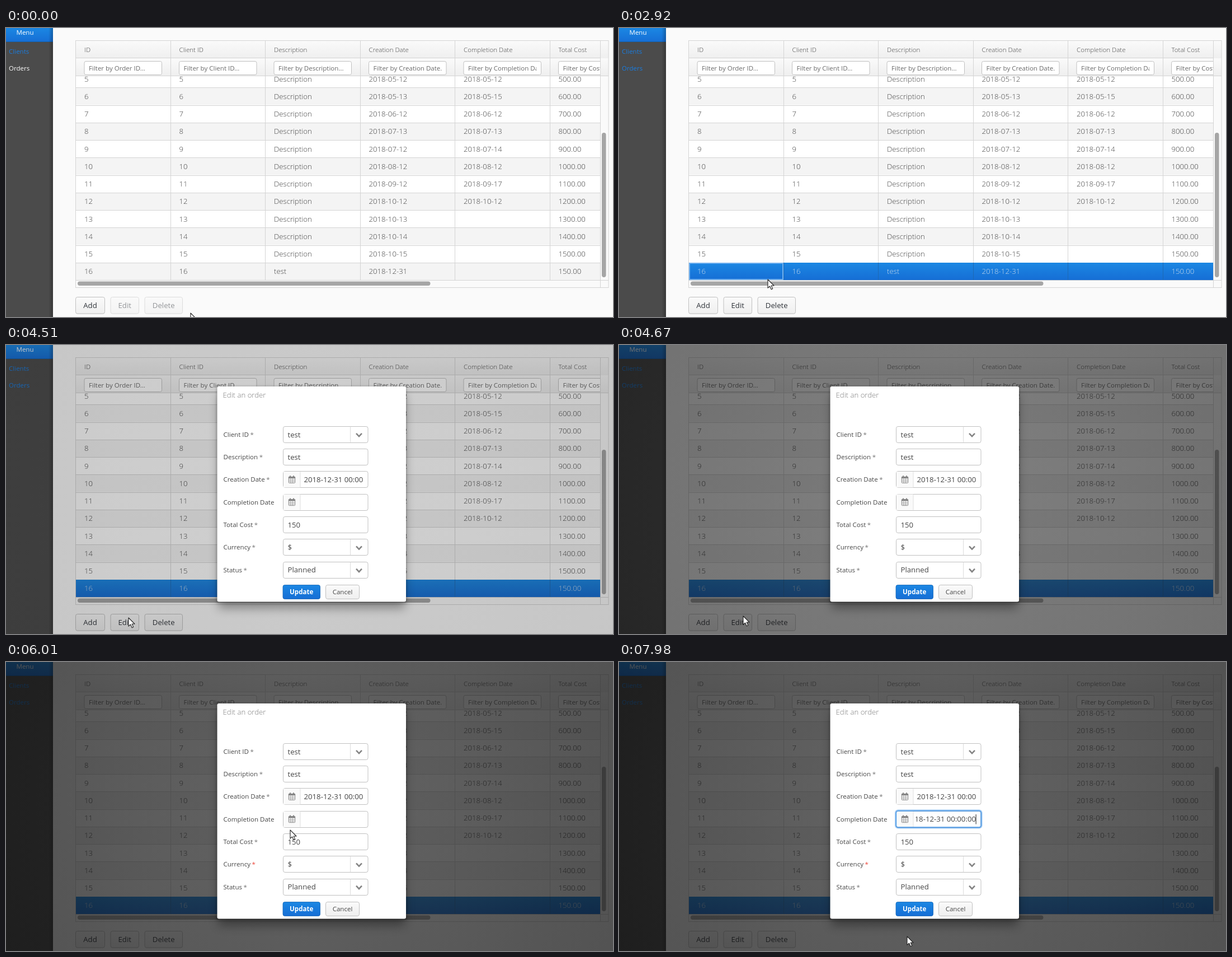
Recreate the animation shown at these times as an HTML page. Size 1085x516 px, loop 8 s.

```html
<!DOCTYPE html>
<html lang="en">
<head>
<meta charset="utf-8">
<title>Orders</title>
<style>
  html, body { margin: 0; width: 100%; height: 100%; overflow: hidden; background: #fafafa; }
  svg { display: block; width: 1085px; height: 516px; }
  text { font-family: "Open Sans", "Noto Sans", sans-serif; font-size: 13.2px; fill: #464646; white-space: pre; }
  .light { font-weight: 300; }
  .small { font-size: 11.55px; }
  .mid { text-anchor: middle; }
  .on text { fill: #c8dbed; }
</style>
</head>
<body>
<svg id="stage" viewBox="0 0 1085 516"></svg>
<script>
const LOOP = 8000;
const LINE = '#d4d4d4', EDGE = '#c0c0c0', BLUE = '#197de1';
const COL = 169.5, ROW = 31.25;

// ---- drawing helpers ----
const rect = (x, y, w, h, fill, more = '') =>
  `<rect x="${x}" y="${y}" width="${w}" height="${h}" fill="${fill}" ${more}/>`;
const text = (x, y, s, cls = '', more = '') =>
  `<text x="${x}" y="${y}" class="${cls}" ${more}>${s}</text>`;
const path = (d, more) => `<path d="${d}" fill="none" ${more}/>`;
const group = (id, body, more = '') => `<g id="${id}" ${more}>${body}</g>`;
const clip = (id, x, y, w, h) => `<clipPath id="${id}">${rect(x, y, w, h, '#000')}</clipPath>`;
const stroke = (c, w = 1) => `stroke="${c}" stroke-width="${w}"`;
const colX = i => 124.5 + COL * i;

const defs = `<defs>
  <linearGradient id="face" x2="0" y2="1"><stop stop-color="#fafafa"/><stop offset="1" stop-color="#efefef"/></linearGradient>
  <linearGradient id="blue" x2="0" y2="1"><stop stop-color="#1b87e3"/><stop offset="1" stop-color="#166ed5"/></linearGradient>
  <linearGradient id="edge"><stop stop-color="#000" stop-opacity="0"/><stop offset="1" stop-color="#000" stop-opacity=".25"/></linearGradient>
  <radialGradient id="dim" gradientUnits="userSpaceOnUse" cx="542" cy="258" r="600"><stop stop-color="#222"/><stop offset="1" stop-color="#0b0b0b"/></radialGradient>
  <filter id="soft" x="-30%" y="-30%" width="160%" height="160%"><feGaussianBlur stdDeviation="9"/></filter>
  <filter id="near" x="-10%" y="-10%" width="120%" height="120%"><feGaussianBlur stdDeviation="2"/></filter>
  ${clip('body', 125, 85, 937, 365)}${clip('head', 125, 23, 937, 63)}
  ${clip('date', 527, 220, 111.8, 80)}${clip('done', 530.5, 266, 108.5, 30)}
</defs>`;

function sidebar() {
  return rect(0, 0, 84, 516, '#4b4b4b') + rect(0, 0, 84, 25, 'url(#blue)') +
    rect(0, 24, 84, 1, '#1362b1') + rect(76, 0, 8, 516, 'url(#edge)') +
    text(34, 12.2, 'Menu', 'small mid', 'style="fill:#fff"') +
    text(5, 46, 'Clients', 'small', `style="fill:${BLUE}"`) +
    text(5, 76.2, 'Orders', 'small', 'id="orders"');
}

// ---- order table ----
const dates = {
  5: ['05-12', '05-12'], 6: ['05-13', '05-15'], 7: ['06-12', '06-12'], 8: ['07-13', '07-13'],
  9: ['07-12', '07-14'], 10: ['08-12', '08-12'], 11: ['09-12', '09-17'], 12: ['10-12', '10-12'],
  13: ['10-13'], 14: ['10-14'], 15: ['10-15'], 16: ['12-31']
};
const heads = ['ID', 'Client ID', 'Description', 'Creation Date', 'Completion Date', 'Total Cost'];
const hints = ['Order ID', 'Client ID', 'Description', 'Creation Date', 'Completion Date', 'Cost'];

function cells(id) {
  const [made, done] = dates[id].map(d => '2018-' + d);
  const cost = (id === 16 ? 150 : id * 100) + '.00';
  const y = 122 + (id - 6) * ROW + 4.8;
  return [id, id, id === 16 ? 'test' : 'Description', made, done || '', cost]
    .map((s, i) => text(colX(i) + 15.5, y, s, 'light')).join('');
}

function table() {
  let rows = '', head = '', lines = '';
  for (let id = 5; id <= 16; id++) {
    const y = 106.4 + (id - 6) * ROW;
    rows += rect(125, y, 937, ROW, id % 2 ? '#fff' : '#f4f4f4') +
      rect(125, Math.round(y), 937, 1, LINE) + cells(id);
  }
  for (let i = 1; i < 6; i++) lines += rect(Math.floor(colX(i)), 23, 1, 427, LINE);
  heads.forEach((h, i) => {
    const x = colX(i) + 15.5;
    head += text(x, 43, h, 'light small') +
      rect(x, 59.5, 138.5, 24, '#fff', `rx="3" ${stroke(EDGE)}`) +
      `<clipPath id="in${i}">${rect(x, 59, 130.3, 25, '#000')}</clipPath>` +
      `<g clip-path="url(#in${i})">${text(x + 8, 75.6, `Filter by ${hints[i]}...`, 'small', 'style="fill:#6a6a6a"')}</g>`;
  });
  const picked = rect(125, 419, 937, 31, 'url(#blue)') +
    [1, 2, 3, 4, 5].map(i => rect(Math.floor(colX(i)), 419, 1, 31, '#1d69b4')).join('') + cells(16);
  return rect(125, 23, 952, 440, '#fff') +
    `<g clip-path="url(#body)">${rows}</g>` +
    rect(125, 23, 952, 31, 'url(#face)') + rect(125, 54, 952, 31, 'url(#face)') +
    rect(125, 53, 937, 1, LINE) + lines +
    `<g clip-path="url(#head)">${head}</g>` + rect(125, 85, 952, 1, LINE) +
    group('picked', picked, 'class="on"') +
    rect(126, 420, 167, 29, 'none', `id="cell" ${stroke('#71b1f0', 2)}`) +
    rect(125, 450, 952, 13, '#fafafa') + rect(125, 450, 937, 1, LINE) +
    rect(1062, 86, 15, 377, '#fafafa') + rect(1062, 23, 1, 440, LINE) + rect(1062, 450, 15, 1, LINE) +
    rect(128, 452.5, 630.5, 7.5, '#a6a6a6', 'rx="3.7"') +
    rect(1065, 187, 7.5, 258, '#a6a6a6', 'rx="3.7"') +
    rect(124.5, 22.5, 952.5, 441, 'none', stroke(LINE));
}

const button = (id, x, w, label) => group(id,
  rect(x, 481, w, 30, '#000', 'rx="3.3" opacity=".05"') +
  rect(x, 480.5, w, 29.5, 'url(#face)', `rx="3.3" ${stroke(EDGE)}`) +
  text(x + w / 2, 500.3, label, 'mid', 'style="fill:#30343a"'));

function buttons() {
  return button('add', 124.5, 52, 'Add') + button('edit', 187, 50.5, 'Edit') +
    button('del', 248, 67.5, 'Delete') +
    rect(187.5, 481, 49.5, 28.5, '#000', 'id="press" rx="3" opacity=".07"') +
    group('ring', rect(186.5, 480, 51.5, 30.5, 'none', `rx="4" ${stroke(BLUE, 2.5)} opacity=".4"`) +
      rect(187, 480.5, 50.5, 29.5, 'none', `rx="3.3" ${stroke('#3f93e6')}`));
}

// ---- order form ----
const chevron = (x, y, w, h, more) => path(`M${x - w} ${y - h}L${x} ${y + h}L${x + w} ${y - h}`, more);

function calendarIcon(y) {
  let grid = rect(505.3, y - 5, 11.4, 11, 'none', `rx="1" ${stroke('#858585')}`) +
    rect(505, y - 5, 12, 3, '#858585') + rect(507, y - 7, 2, 4, '#858585') + rect(513, y - 7, 2, 4, '#858585');
  for (const k of [0, 1]) grid += rect(508.5 + k * 3.7, y - 2, .8, 8, '#999') + rect(505.5, y + .3 + k * 2.8, 11, .8, '#999');
  return grid;
}

const fields = [
  ['Client ID', 'test', 'pick'], ['Description', 'test'], ['Creation Date', '2018-12-31 00:00:00', 'date'],
  ['Completion Date', '', 'date'], ['Total Cost', '150'], ['Currency', '$', 'pick'], ['Status', 'Planned', 'pick']
];

function field([label, value, kind], i) {
  const y = 159.7 + i * 40.3;
  const star = label === 'Completion Date' ? '' :
    `<tspan dx="2.5" id="star${i}" style="fill:#777">*</tspan>`;
  let s = text(388.5, y + 4, label + star, 'small') +
    rect(495.5, Math.round(y - 15) + .5, 151.5, 29, '#fff', `rx="3.3" ${stroke(EDGE)}`);
  if (kind === 'pick') {
    s += rect(615, y - 14, 1, 28, '#dcdcdc') +
      chevron(631, y + .8, 5, 2.7, stroke('#858585', 2.6));
  }
  if (kind === 'date') {
    s += rect(496, y - 14, 30, 28, '#fafafa') + rect(525.5, y - 14, 1, 28, '#e0e0e0') + calendarIcon(y);
  }
  const x = kind === 'date' ? 532.5 : 503.5;
  return s + (kind === 'date' ? `<g clip-path="url(#date)">${text(x, y + 4.8, value)}</g>` : text(x, y + 4.8, value));
}

function form() {
  return rect(380, 88, 333, 382, '#000', 'filter="url(#soft)" opacity=".35"') +
    rect(377, 75, 338, 385, '#000', 'filter="url(#near)" opacity=".35"') +
    rect(377.5, 74, 337.5, 384.5, '#fff', 'rx="3.3"') +
    text(387.5, 93.6, 'Edit an order', 'light', 'style="fill:#7d7d7d"') +
    fields.map(field).join('') +
    rect(495, 428.5, 66.5, 25, 'url(#blue)', `rx="3.3" ${stroke('#1362b1', .8)}`) +
    text(528.2, 445, 'Update', 'small mid', 'style="fill:#fff;font-weight:700"') +
    rect(571.5, 428.5, 60, 25, 'url(#face)', `rx="3.3" ${stroke(EDGE)}`) +
    text(601.5, 445, 'Cancel', 'small mid') +
    group('filled',
      rect(494.5, 265, 153.5, 31, 'none', `rx="4.3" ${stroke(BLUE, 3)} opacity=".45"`) +
      rect(495.5, 266, 151.5, 29, 'none', `rx="3.3" ${stroke('#2b86e3')}`) +
      `<g clip-path="url(#done)">${text(638, 285.4, '2018-12-31 00:00:00', '', 'text-anchor="end"')}</g>` +
      rect(637.6, 272, 1, 17.5, '#222'));
}

// December 2018, weeks starting on Monday
function calendar() {
  let s = rect(496, 301, 207, 204, '#000', 'rx="3" filter="url(#near)" opacity=".3"') +
    rect(496.5, 299.5, 206, 204, '#fff', `rx="3" ${stroke('#c4c4c4')}`) +
    text(599.5, 320, 'December 2018', 'small mid', `style="fill:${BLUE}"`);
  const arrow = (x, d) => path(`M${x + d * 2} 312L${x - d * 2} 316L${x + d * 2} 320`, stroke('#a0a0a0', 1.6));
  s += arrow(508, 1) + arrow(513, 1) + arrow(530, 1) + arrow(669, -1) + arrow(686, -1) + arrow(691, -1);
  const x = i => 515 + i * 28.2;
  ['Mon', 'Tue', 'Wed', 'Thu', 'Fri', 'Sat', 'Sun'].forEach((d, i) => {
    s += text(x(i), 343.5, d, 'mid', 'style="font-size:9.8px;fill:#8d8d8d"');
  });
  for (let k = 0; k < 42; k++) {
    const day = k < 5 ? 26 + k : k < 36 ? k - 4 : k - 35;
    const dim = k < 5 || k > 35;
    s += text(x(k % 7), 367 + Math.floor(k / 7) * 25, day, 'small mid', `style="fill:${dim ? '#b4b4b4' : '#464646'}"`);
  }
  return s;
}

// ---- pointer ----
const pointer = group('mouse',
  '<path id="arrow" d="M0 0V15.2L3.6 12L6.2 17.8L8.7 16.6L6.2 11H11Z" fill="#fff" stroke="#222" stroke-width="1.1" stroke-linejoin="round"/>' +
  '<path id="hand" d="M-1.4 .6Q0-.6 1.4 .6V6.5Q3-.1+6 4 6.8Q5.6 6 6.6 7.6Q8.3 7 8.6 9V13Q8 15 7 16.5V18.5H-1V17L-4.8 11.5Q-5.2 9.2-3.2 10L-1.4 12Z" fill="#fff" stroke="#111" stroke-width="1.1" stroke-linejoin="round"/>'
    .replace('Q3-.1+6 4 6.8', 'Q3 5.3 4 6.8'));

const $ = id => document.getElementById(id);
$('stage').innerHTML = defs + rect(0, 0, 1085, 516, '#fafafa') + sidebar() + table() + buttons() +
  rect(0, 0, 1085, 516, 'url(#dim)', 'id="curtain"') +
  group('form', form()) + group('calendar', calendar()) + pointer;

// ---- motion: time, x, y ----
const track = [
  [0, 330, 509], [210, 330, 509], [290, 320, 508], [370, 308, 504], [450, 308, 504],
  [770, 255, 480], [1010, 202, 467], [1330, 262, 490], [1570, 312, 488], [1970, 207, 503],
  [2210, 275, 486], [2610, 270, 434], [2760, 270, 434], [3080, 262, 464], [3480, 213, 496],
  [3710, 214, 498], [4190, 214, 498], [4350, 216, 492], [4510, 219, 487], [4830, 225, 481],
  [5060, 248, 470], [5140, 268, 440], [5220, 302, 390], [5300, 333, 349], [5450, 333, 349],
  [5690, 432, 356], [5850, 478, 336], [6010, 508, 300], [6250, 507, 275], [6490, 507, 275],
  [6650, 530, 330], [6950, 556, 420], [7270, 533, 487], [7430, 515, 490], [8000, 515, 490]
];
// the picture advances in ticks of 80 ms from each of these times
const ticks = [50, 2760, 3630, 3860, 4270, 5060, 5530, 6490, 7270, 7580];

function tick(t) {
  const from = ticks.filter(s => s <= t).pop();
  return from === undefined ? 0 : from + Math.floor((t - from) / 80) * 80;
}

function place(t) {
  const i = Math.max(1, track.findIndex(k => k[0] >= t));
  const [a, b] = [track[i - 1], track[i]];
  const p = (t - a[0]) / (b[0] - a[0]);
  return [a[1] + (b[1] - a[1]) * p, a[2] + (b[2] - a[2]) * p];
}

const ramp = (t, from, to) => Math.min(1, Math.max(0, (t - from) / (to - from)));
const ease = p => { const q = Math.pow(p, .62); return q * q * (3 - 2 * q); };
const within = (t, a, b) => t >= a && t < b;
const show = (id, on) => { $(id).style.display = on ? '' : 'none'; };
const fade = (id, o) => { $(id).style.opacity = o; show(id, o > 0); };

function draw(now) {
  const t = tick(now % LOOP);
  const chosen = t >= 2760;
  $('orders').style.fill = chosen ? BLUE : '#fff';
  $('edit').style.opacity = $('del').style.opacity = chosen ? 1 : .5;
  show('picked', chosen);
  show('cell', within(t, 2760, 3630));
  show('press', within(t, 3630, 3860));
  show('ring', within(t, 3630, 4350));

  fade('curtain', .7 * ease(ramp(t, 4430, 4830)));
  fade('form', ramp(t, 4330, 4470));
  fade('calendar', ramp(t, 6450, 6610) * (1 - ramp(t, 7540, 7700)));
  show('filled', t >= 7580);
  $('star5').style.fill = t >= 5690 ? '#ed473b' : '#777';

  const [x, y] = place(t);
  const hand = within(t, 3320, 4350) || within(t, 6170, 6570) || within(t, 6730, 7580);
  $('mouse').setAttribute('transform', `translate(${x} ${y})`);
  show('hand', hand);
  show('arrow', !hand);
  $('arrow').setAttribute('fill', within(t, 4800, 5060) ? '#8fe88f' : '#fff');
}

const begin = performance.now();
function frame() {
  draw(performance.now() - begin);
  requestAnimationFrame(frame);
}
frame();
</script>
</body>
</html>
```
